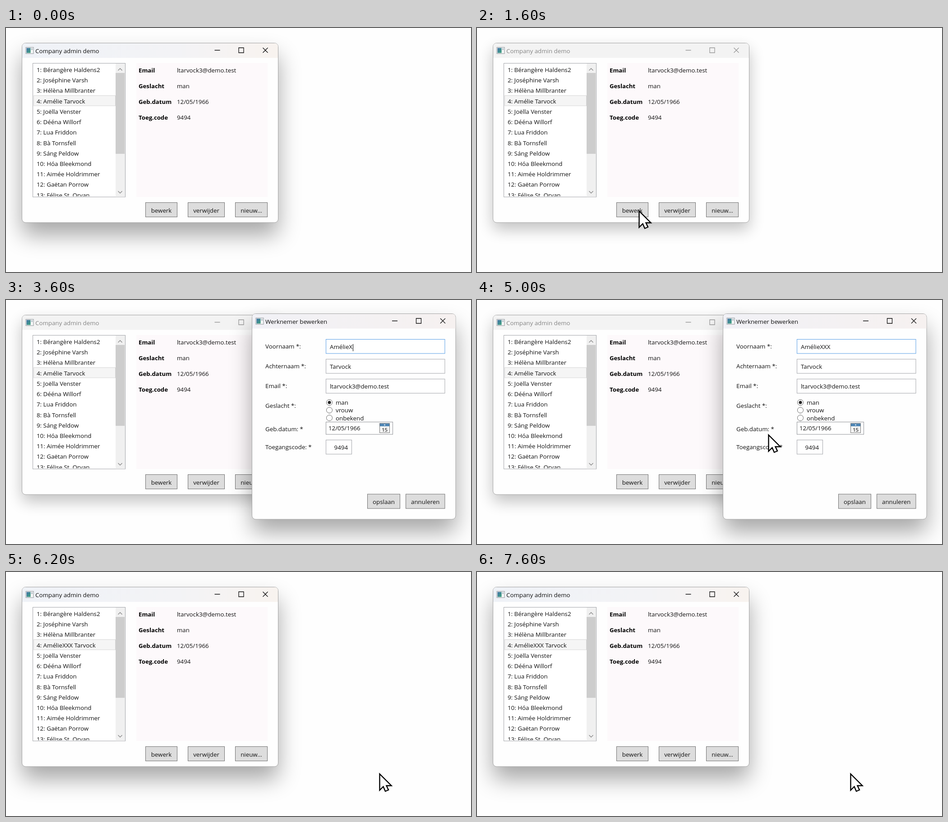
An HTML page for the animation above (7800 ms loop, 1031 by 543 pixels).

```html
<!DOCTYPE html>
<html lang="nl">
<head>
<meta charset="utf-8">
<title>Company admin demo</title>
<style>
  html, body { margin: 0; width: 100%; height: 100%; overflow: hidden; background: #fefefe; }
  svg { display: block; width: 1031px; height: 543px; font: 13.3px "Open Sans", "Noto Sans", sans-serif; }
  text { fill: #111; white-space: pre; }
  .bold { font-weight: 700; font-size: 13.2px; fill: #000; }
  .shadow { filter: blur(25px); opacity: .34; transform: translateY(28px); }
  .idle .shadow { filter: blur(17px); opacity: .24; transform: translateY(15px); }
  .frame { fill: #fefefe; stroke: #a5a5a5; }
  .idle .bar { fill: #f3f3f3; }
  .idle .title { fill: #858585; }
  .glyph { fill: none; stroke: #111; stroke-width: 1.3; }
  .idle .glyph { stroke: #999; }
  .box { fill: #fff; stroke: #a3a5aa; }
  .box.over { stroke: #7eb4ea; }
  .box.focus { stroke: #569de5; }
  .button rect { fill: #ddd; stroke: #707070; }
  .button.over rect { fill: #bee6fd; stroke: #3c7fb1; }
  .button.down rect { fill: #c4e5f6; stroke: #2c628b; }
  .chevron { fill: none; stroke: #8a8a8a; stroke-width: 1.4; }
  .radio { fill: #fff; stroke: #666; }
</style>
</head>
<body>
<svg id="stage" viewBox="0 0 1031 543">
  <defs>
    <linearGradient id="mainBar"><stop stop-color="#eff2f7"/><stop offset=".6" stop-color="#f3f3f6"/><stop offset="1" stop-color="#f8f3ef"/></linearGradient>
    <linearGradient id="dialogBar"><stop stop-color="#f1f1f6"/><stop offset="1" stop-color="#f6f1f0"/></linearGradient>
    <linearGradient id="teal" x2="1" y2="1"><stop stop-color="#3f6fa8"/><stop offset="1" stop-color="#3fa57c"/></linearGradient>
    <clipPath id="listClip"><path d="M60 79H243V374.5H60Z"/></clipPath>
  </defs>
</svg>
<script>
const LOOP = 7800, STEP = 200;
const first = "Amélie", last = "Tarvock", email = "ltarvock3@demo.test";
const birthday = "12/05/1966", code = "9494";
const people = ["Bérangère Haldens2", "Joséphine Varsh", "Hélèna Millbranter", `${first} ${last}`,
  "Joëlla Venster", "Dééna Willorf", "Lua Friddon", "Bà Tornsfell", "Sáng Peldow",
  "Hóa Bleekmond", "Aimée Holdrimmer", "Gaëtan Porrow", "Félise St. Orvan"];

const text = (x, y, s, attrs = "") => `<text x="${x}" y="${y}" ${attrs}>${s}</text>`;
const rect = (x, y, w, h, attrs = "") => `<rect x="${x}" y="${y}" width="${w}" height="${h}" ${attrs}/>`;
const box = (x, y, w, h, attrs = "") => rect(x, y, w, h, attrs || 'class="box"');
const path = (d, cls) => `<path d="${d}" class="${cls}"/>`;

function button(x, y, w, label) {
  return `<g class="button" data-x="${x}" data-y="${y}" data-w="${w}">${rect(x, y, w, 32)}` +
    text(x + w / 2, y + 22, label, 'text-anchor="middle"') + "</g>";
}

function appWindow(id, x, y, w, h, title, body) {
  const mid = y + 16, right = x + w;
  const bar = `M${x + .5} ${y + 33}V${y + 8}q0 -7.5 7.5 -7.5H${right - 8}q7.5 0 7.5 7.5V${y + 33}Z`;
  const controls = `M${right - 141} ${mid}h12M${right - 87.5} ${mid - 5.5}h11v11h-11z` +
    `M${right - 34} ${mid - 5.5}l11 11m0 -11l-11 11`;
  return `<g id="${id}">${rect(x, y, w, h, 'rx="8" class="shadow"')}
    ${rect(x, y, w, h, 'rx="8" class="frame"')}
    <path d="${bar}" class="bar" fill="url(#${id}Bar)"/>
    ${rect(x + 8.5, y + 9.5, 17, 14, 'fill="#f6f6f6" stroke="#8d9399"')}
    ${rect(x + 10, y + 11, 9, 11, 'fill="url(#teal)"')}
    ${rect(x + 20.5, y + 11.5, 3, 4, 'fill="#b9c3cc"')}
    ${text(x + 29.5, y + 22, title, 'class="title"')}${path(controls, "glyph")}${body}</g>`;
}

function mainBody() {
  const rows = people.map((name, i) =>
    text(68, 98 + i * 23.22, `${i + 1}: ${name}`, i === 3 ? 'id="selected"' : "")).join("");
  const details = [["Email", email], ["Geslacht", "man"], ["Geb.datum", birthday], ["Toeg.code", code]]
    .map(([key, value], i) => text(294, 99 + i * 34.9, key, 'class="bold"') + text(379, 99 + i * 34.9, value)).join("");
  return rect(289, 78, 291, 298, 'fill="#fdf9fb"') + details +
    box(59.5, 78.5, 205, 297.5) +
    rect(61.5, 150.5, 181, 22.5, 'fill="#f5f5f5" stroke="#d6d6d6"') +
    `<g clip-path="url(#listClip)">${rows}</g>` +
    rect(243, 79, 21, 296.5, 'fill="#f0f0f0"') + rect(243, 100, 20, 180, 'fill="#cdcdcd"') +
    path("M248.5 94.5l4.5 -4.5l4.5 4.5M248.5 363l4.5 4.5l4.5 -4.5", "chevron") +
    button(309.5, 388.5, 70, "bewerk") + button(403.5, 388.5, 81, "verwijder") + button(508.5, 388.5, 71, "nieuw...");
}

function dialogBody() {
  const labels = [["Voornaam *:", 107.5], ["Achternaam *:", 151.5], ["Email *:", 195.5],
    ["Geslacht *:", 240], ["Geb.datum: *", 291.5], ["Toegangscode: *", 331.5]];
  const fields = [first, last, email].map((value, i) =>
    box(709.5, 87.5 + i * 44.2, 263.5, 31.5, i ? "" : 'class="box" id="field"') +
    text(718, 108.5 + i * 44.2, value, i ? "" : 'id="firstName"')).join("");
  const radios = ["man", "vrouw", "onbekend"].map((value, i) =>
    `<circle cx="717" cy="${228 + i * 17.2}" r="6.5" class="radio"/>` + text(731, 233 + i * 17.4, value)).join("");
  return labels.map(([s, y]) => text(575, y, s)).join("") + fields +
    rect(0, 98, 1, 16, 'id="caret"') + radios + '<circle cx="717" cy="228" r="3.5" fill="#222"/>' +
    box(709.5, 271.5, 148, 27.5, 'fill="#fff" stroke="#8f9196"') + text(715, 289.5, birthday) +
    rect(828.5, 274.5, 22, 21, 'fill="#f4f4f4" stroke="#777"') + rect(829, 275, 21, 6, 'fill="#4f86b5"') +
    '<circle cx="839.5" cy="278" r="1.3" fill="#fff"/>' +
    text(839.5, 292.5, "15", 'text-anchor="middle" style="font-size:11.5px;font-weight:600;fill:#444"') +
    box(709.5, 311.5, 57, 31.5) + text(758, 332.5, code, 'text-anchor="end"') +
    button(801.5, 432, 72, "opslaan") + button(886.5, 432, 86.5, "annuleren");
}

const stage = document.getElementById("stage");
stage.innerHTML += appWindow("main", 35.5, 33.5, 568, 399.5, "Company admin demo", mainBody()) +
  appWindow("dialog", 545.5, 30.5, 451.5, 457.5, "Werknemer bewerken", dialogBody()) +
  `<path id="pointer" d="M1.5 3.5V39.5L9.5 31.5L14 42L21 39L16.5 29.5H27.5Z"
    fill="#fff" stroke="#000" stroke-width="2.4"/>`;

const $ = id => document.getElementById(id);
const show = (el, on) => { el.style.display = on ? "" : "none"; };
const buttons = [...document.querySelectorAll(".button")];

// Each move: start, arrival, hidden at, from, to
const moves = [
  [200, 1200, 2000, [492, 419], [358, 404]],
  [2000, 2600, 2600, [783, 43], [788, 75]],
  [5000, 6000, LOOP, [645, 297], [827, 446]],
];

function pointerAt(t) {
  const move = moves.find(([start, , end]) => t >= start && t < end);
  if (!move) return null;
  const [start, arrival, , from, to] = move;
  const p = Math.min(1, (t - start) / (arrival - start)), eased = p * p * (3 - 2 * p);
  return from.map((v, i) => v + (to[i] - v) * eased);
}

function draw(t) {
  const open = t >= 2000 && t < 6200;
  const idle = t >= 1600 && t < 6200;
  const focused = t >= 3000 && t < 6000;
  const pressed = t === 1400 || t === 6000;
  const pointer = pointerAt(t);

  $("main").classList.toggle("idle", idle);
  show($("dialog"), open);
  show($("pointer"), pointer);
  if (pointer) $("pointer").setAttribute("transform", `translate(${pointer})`);

  for (const el of buttons) {
    const { x, y, w } = el.dataset;
    const enabled = el.closest("#dialog") ? open : !idle;
    const over = enabled && pointer && pointer[0] >= +x && pointer[0] <= +x + +w &&
      pointer[1] >= +y && pointer[1] <= +y + 32;
    el.classList.toggle("over", !!over);
    el.classList.toggle("down", !!over && pressed);
  }

  const typed = Math.max(0, Math.min(3, Math.floor((t - 3200) / 400)));
  $("firstName").textContent = first + "X".repeat(typed);
  $("field").setAttribute("class", "box" + (focused ? " focus" : t >= 2600 && t < 3000 ? " over" : ""));
  const caretOn = t >= 3000 && t < 4600;
  show($("caret"), caretOn);
  if (caretOn) $("caret").setAttribute("x", Math.round(719 + $("firstName").getComputedTextLength()));
  $("selected").textContent = `4: ${first}${t >= 6200 ? "XXX" : ""} ${last}`;
}

const began = performance.now();
function tick() {
  const t = (performance.now() - began) % LOOP;
  draw(Math.floor(t / STEP) * STEP);
  requestAnimationFrame(tick);
}
tick();
</script>
</body>
</html>
```
